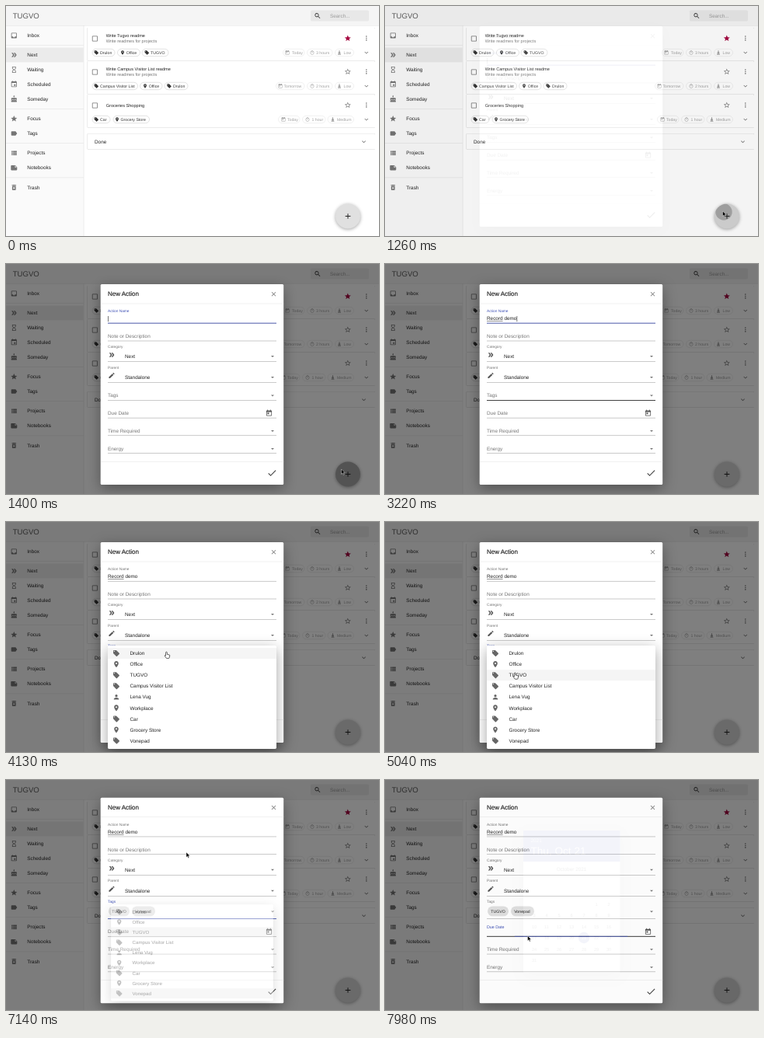
Recreate the animation shown at these times as an HTML page. Size 480 by 296 pixels, loop 8000 ms.

```html
<!DOCTYPE html>
<html lang="en">
<head>
<meta charset="utf-8">
<title>New action</title>
<style>
html, body { margin: 0; width: 100%; height: 100%; overflow: hidden; background: #fff; }
svg { display: block; width: 480px; height: 296px; }
text { font-family: "Liberation Sans", Arial, sans-serif; white-space: pre; text-rendering: geometricPrecision; }
.card { filter: drop-shadow(0 .6px .6px rgba(0,0,0,.32)); }
.float { filter: drop-shadow(0 1.6px 2.2px rgba(0,0,0,.36)); }
.deep { filter: drop-shadow(0 5px 9px rgba(0,0,0,.36)); }
</style>
</head>
<body>
<svg id="stage" viewBox="0 0 480 296" xmlns="http://www.w3.org/2000/svg"></svg>
<script>
const LOOP = 8000, STEP = 70;
const INK = '#212121', SOFT = '#757575', PALE = '#a0a0a0', BLUE = '#3f51b5', LINE = '#949494';

const ICON = {
  inbox: 'M19 3H5c-1.1 0-2 .9-2 2v14c0 1.1.9 2 2 2h14c1.1 0 2-.9 2-2V5c0-1.1-.9-2-2-2zm0 12h-4c0 1.7-1.3 3-3 3s-3-1.3-3-3H5V5h14z',
  next: 'M15.5 5H11l5 7-5 7h4.5l5-7zM8.5 5H4l5 7-5 7h4.5l5-7z',
  wait: 'M6 2v6l4 4-4 4v6h12v-6l-4-4 4-4V2zm10 14.5V20H8v-3.5l4-4zm-4-5l-4-4V4h8v3.5z',
  event: 'M17 12h-5v5h5zM16 1v2H8V1H6v2H5c-1.1 0-2 .9-2 2v14c0 1.1.9 2 2 2h14c1.1 0 2-.9 2-2V5c0-1.1-.9-2-2-2h-1V1zm3 18H5V8h14z',
  today: 'M7 10h5v5H7zM16 1v2H8V1H6v2H5c-1.1 0-2 .9-2 2v14c0 1.1.9 2 2 2h14c1.1 0 2-.9 2-2V5c0-1.1-.9-2-2-2h-1V1zm3 18H5V8h14z',
  cake: 'M12 0l-1.7 3C9.500 4.500 10.500 6 12 6s2.500-1.500 1.700-3zM11 7v2H6c-1.700 0-3 1.300-3 3v1.500c0 2 2.200 2.600 3.400 1.400l2.100-2.100 2.100 2.100c.8.8 2 .8 2.800 0l2.100-2.100 2.100 2.100c1.200 1.200 3.400.6 3.400-1.400V12c0-1.700-1.300-3-3-3h-5V7zM3 16.400V22h18v-5.600c-1.500 1-3.300.7-4.400-.4l-1.100-1.100-1.100 1.100c-1.300 1.300-3.500 1.300-4.800 0l-1.100-1.100L7.400 16c-1.100 1.100-2.900 1.400-4.400.4z',
  star: 'M12 17.300L18.200 21l-1.700-7L22 9.200l-7.200-.6L12 2 9.200 8.600 2 9.200 7.500 14l-1.700 7z',
  starLine: 'M22 9.200l-7.200-.6L12 2 9.200 8.600 2 9.200 7.500 14l-1.700 7 6.200-3.700 6.200 3.700-1.600-7zM12 15.400l-3.800 2.300 1-4.300-3.300-2.900 4.400-.4L12 6.100l1.700 4 4.400.4-3.300 2.900 1 4.300z',
  label: 'M17.600 5.800C17.300 5.300 16.700 5 16 5H5c-1.100 0-2 .9-2 2v10c0 1.100.9 2 2 2h11c.7 0 1.300-.3 1.600-.8L22 12z',
  list: 'M4 14h4v-4H4zm0 5h4v-4H4zM4 9h4V5H4zm5 5h12v-4H9zm0 5h12v-4H9zM9 5v4h12V5z',
  note: 'M22 10l-6-6H4c-1.100 0-2 .9-2 2v12c0 1.100.9 2 2 2h16c1.100 0 2-.9 2-2zm-7-4.500l5.500 5.500H15z',
  trash: 'M6 19c0 1.100.9 2 2 2h8c1.100 0 2-.9 2-2V7H6zm2.500-7.100l1.400-1.400 2.100 2.100 2.100-2.100 1.400 1.400-2.100 2.100 2.100 2.100-1.400 1.400-2.100-2.100-2.100 2.100-1.400-1.400 2.100-2.100zM15.500 4l-1-1h-5l-1 1H5v2h14V4z',
  tag: 'M21.400 11.600l-9-9C12 2.200 11.500 2 11 2H4c-1.100 0-2 .9-2 2v7c0 .6.2 1 .6 1.400l9 9c.8.8 2 .8 2.800 0l7-7c.8-.8.800-2 0-2.800zM5.500 7a1.500 1.500 0 1 1 0-3 1.500 1.500 0 0 1 0 3z',
  place: 'M12 2C8.100 2 5 5.100 5 9c0 5.200 7 13 7 13s7-7.800 7-13c0-3.900-3.100-7-7-7zm0 9.500a2.500 2.500 0 1 1 0-5 2.500 2.500 0 0 1 0 5z',
  person: 'M12 12a4 4 0 1 0 0-8 4 4 0 0 0 0 8zm0 2c-2.700 0-8 1.300-8 4v2h16v-2c0-2.700-5.300-4-8-4z',
  timer: 'M15 1H9v2h6zm-4 13h2V8h-2zM12 4a9 9 0 1 0 0 18 9 9 0 0 0 0-18zm0 16a7 7 0 1 1 0-14 7 7 0 0 1 0 14z',
  energy: 'M10 2h4v7h2l2 9H6l2-9h2zM5 19h14v3H5z',
  more: 'M10 6a2 2 0 1 0 4 0 2 2 0 0 0-4 0zM10 12a2 2 0 1 0 4 0 2 2 0 0 0-4 0zM10 18a2 2 0 1 0 4 0 2 2 0 0 0-4 0z',
  open: 'M16.600 8.600L12 13.200 7.400 8.600 6 10l6 6 6-6z',
  drop: 'M7 10l5 5 5-5z',
  box: 'M19 5v14H5V5zm0-2H5c-1.100 0-2 .9-2 2v14c0 1.100.9 2 2 2h14c1.100 0 2-.9 2-2V5c0-1.100-.9-2-2-2z',
  add: 'M19 13h-6v6h-2v-6H5v-2h6V5h2v6h6z',
  close: 'M19 6.400L17.600 5 12 10.600 6.400 5 5 6.400 10.600 12 5 17.600 6.400 19l5.600-5.600 5.600 5.600 1.400-1.400L13.400 12z',
  check: 'M9 16.200L4.800 12l-1.400 1.400L9 19 21 7l-1.400-1.400z',
  pen: 'M3 17.200V21h3.800L17.800 9.900 14.100 6.200zM20.700 7c.4-.4.4-1 0-1.400l-2.300-2.300c-.4-.4-1-.4-1.400 0l-1.800 1.800 3.700 3.700z',
  find: 'M15.500 14h-.8l-.3-.3a6.500 6.500 0 1 0-.7.7l.3.300v.8l5 5 1.500-1.500zm-6 0a4.500 4.500 0 1 1 0-9 4.500 4.500 0 0 1 0 9z'
};

const text = (x, y, s, size = 6.4, fill = INK, more = '') =>
  `<text x="${x}" y="${y}" font-size="${size}" fill="${fill}" ${more}>${s}</text>`;
const icon = (name, cx, cy, size = 9.6, fill = SOFT) =>
  `<path d="${ICON[name]}" fill="${fill}" fill-rule="evenodd" transform="translate(${cx - size / 2} ${cy - size / 2}) scale(${size / 24})"/>`;
const rect = (x, y, w, h, fill, more = '') =>
  `<rect x="${x}" y="${y}" width="${w}" height="${h}" fill="${fill}" ${more}/>`;
const rule = (x, y, w, fill = LINE, h = .5, more = '') => rect(x, y - h / 2, w, h, fill, more);
const group = (id, body, more = '') => `<g id="${id}" ${more}>${body}</g>`;

// name, icon, centre line
const NAV = [['Inbox', 'inbox', 38], ['Next', 'next', 63], ['Waiting', 'wait', 82], ['Scheduled', 'event', 100.700],
  ['Someday', 'cake', 119.500], ['Focus', 'star', 145], ['Tags', 'label', 164], ['Projects', 'list', 189.200],
  ['Notebooks', 'note', 208.200], ['Trash', 'trash', 233.500]];

// chip: left, right, icon, icon x, text x, label
const CARDS = [
  { y: 42, title: 'Write Tugvo readme', sub: 'Write readmes for projects', star: 1,
    chips: [[111, 140, 'tag', 116.300, 121, 'Drulon'], [143.500, 172.500, 'place', 150, 154.800, 'Office'], [175, 209, 'tag', 181.300, 186, 'TUGVO']],
    info: [[356.500, 384, 'today', 362, 368, 'Today'], [387.500, 420, 'timer', 394, 399, '3 hours'], [423.500, 447.500, 'energy', 429, 434.500, 'Low']] },
  { y: 85, title: 'Write Campus Visitor List readme', sub: 'Write readmes for projects',
    chips: [[111, 169.500, 'tag', 116.300, 121, 'Campus Visitor List'], [172.500, 201, 'place', 179, 183.700, 'Office'], [204, 234, 'tag', 210, 215, 'Drulon']],
    info: [[347.500, 384, 'today', 353, 357.500, 'Tomorrow'], [387.500, 420, 'timer', 394, 399, '2 hours'], [423.500, 447.500, 'energy', 429, 434.500, 'Low']] },
  { y: 128, title: 'Groceries Shopping',
    chips: [[111, 134, 'tag', 116.300, 121, 'Car'], [138, 184.500, 'place', 143, 147.500, 'Grocery Store']],
    info: [[350.500, 378, 'today', 357, 362, 'Today'], [381.500, 411, 'timer', 388, 393.500, '1 hour'], [414, 447.500, 'energy', 420.500, 426, 'Medium']] }
];

const TAGS = [['Drulon', 'tag'], ['Office', 'place'], ['TUGVO', 'tag'], ['Campus Visitor List', 'tag'], ['Lena Vug', 'person'],
  ['Workplace', 'place'], ['Car', 'tag'], ['Grocery Store', 'place'], ['Vonepad', 'tag']];
const ROW = 14.060, TOP = 162;

function chip([l, r, name, ix, tx, s], cy, ink, edge) {
  return rect(l, cy - 4.700, r - l, 9.400, 'none', `rx="4.700" stroke="${edge}" stroke-width=".5"`) +
    icon(name, ix, cy, 6.600, ink) + text(tx, cy + 1.900, s, 5.200, ink);
}

function card(c) {
  const y = c.y, low = y + 18;
  return rect(104.500, y - 14, 370.500, 42.400, '#fff', 'rx="1.200" class="card"') +
    icon('box', 114.400, y, 9.600) +
    text(128.700, y + (c.sub ? -2.100 : 2), c.title, 5.600) +
    (c.sub ? text(128.700, y + 5.300, c.sub, 5.600, SOFT) : '') +
    icon(c.star ? 'star' : 'starLine', 439.800, y - .5, 9.600, c.star ? '#a5063f' : SOFT) +
    icon('more', 463.800, y - .5) + icon('open', 463.800, low) +
    c.chips.map(k => chip(k, low, '#333', '#c4c4c4')).join('') +
    c.info.map(k => chip(k, low, PALE, '#e0e0e0')).join('');
}

function page() {
  return rect(0, 0, 480, 296, '#fff') +
    rect(0, 25, 100, 271, '#fafafa') + rect(99.800, 25, .5, 271, '#dcdcdc') +
    rect(0, 53.600, 99.800, 18.800, '#ebebeb') +
    [50.500, 132.300, 176.600, 220.900].map(y => rule(0, y, 99.800, '#dcdcdc')).join('') +
    NAV.map(([s, name, y]) => icon(name, 10.300, y) + text(27.300, y + 2.100, s)).join('') +
    CARDS.map(card).join('') +
    rect(104.500, 164.300, 370.500, 20.200, '#fff', 'rx="1.200" class="card"') +
    text(114, 177, 'Done') + icon('open', 460.500, 174.700) +
    rect(0, 0, 480, 25.200, '#f5f5f5', 'class="card"') +
    text(8.700, 15.900, 'TUGVO', 9.600, '#5c5c5c') +
    rect(392, 5.600, 75, 14, '#e8e8e8', 'rx="1.600"') +
    icon('find', 401, 12.700, 9.600, '#333') + text(417, 14.900, 'Search...', 6.400, '#9a9a9a') +
    '<clipPath id="fabClip"><circle cx="440" cy="270.500" r="16"/></clipPath>' +
    '<circle id="fab" cx="440" cy="270.500" r="16" class="float"/>' +
    '<g clip-path="url(#fabClip)"><circle id="fabWave" cx="436" cy="265"/></g>' +
    icon('add', 440, 270.500, 11.500, INK);
}

const small = (id, y, s) => text(131, y, s, 4.800, SOFT, `id="${id}"`);
const arrow = y => icon('drop', 343, y);
const focusLine = (id, y) => rule(131, y, 217, BLUE, .8, `id="${id}"`);

function dialog() {
  const upper =
    text(131, 41.300, 'New Action', 8, INK, `stroke="${INK}" stroke-width=".16"`) +
    icon('close', 344.500, 38.700) + rule(122, 51, 235.300, '#e2e2e2') +
    small('nameLabel', 62.400, 'Action Name') + rule(131, 76.200, 217) + focusLine('nameLine', 76.100) +
    text(131, 72.100, '', 6.400, INK, 'id="name"') +
    rule(131, 73.600, 20.600, '#555', .6, 'id="spell"') +
    rect(131, 67, .6, 7.200, INK, 'id="caret"') +
    text(131, 95, 'Note or Description', 6.400, SOFT) + rule(131, 99, 217) +
    small('c', 107.800, 'Category') + icon('next', 136, 117, 9.600, '#555') + text(153, 121.400, 'Next') +
    arrow(118.800) + rule(131, 125.500, 217) +
    small('p', 134.500, 'Parent') + icon('pen', 136, 143.500, 9.600, '#555') + text(153, 148.100, 'Standalone') +
    arrow(145.700) + rule(131, 152.500, 217) +
    text(0, 0, 'Tags', 6.400, SOFT, 'id="tagLabel"');
  const lower =
    rule(131, 175.500, 217) + rule(131, 175.400, 217, INK, .8, 'id="tagHover"') + focusLine('tagLine', 175.400) +
    text(0, 0, 'Due Date', 6.400, SOFT, 'id="dateLabel"') + icon('today', 338.500, 192, 9.600, '#555') +
    rule(131, 198.100, 217) + rule(131, 198, 217, INK, .8, 'id="dateHover"') + focusLine('dateLine', 198) +
    text(131, 216.800, 'Time Required', 6.400, SOFT) + arrow(214.800) + rule(131, 220.800, 217) +
    text(131, 239.700, 'Energy', 6.400, SOFT) + arrow(237.800) + rule(131, 243.600, 217) +
    rule(122, 254.500, 235.300, '#e2e2e2') + icon('check', 342.300, 269, 14, '#444');
  const pill = (id, x, w, tx, s) => group(id, rect(x, 162.500, w, 12.800, '#e0e0e0', 'rx="6.400"') + text(tx, 170.800, s, 5.200));
  return rect(0, 0, 480, 296, '#000', 'opacity=".5"') +
    rect(121.700, 26, 235.500, 258, '#fff', 'id="paper" rx="1.600" class="deep"') +
    group('upper', upper) + group('lower', lower) + arrow(169.300) +
    pill('pillA', 132, 27, 136.300, 'TUGVO') + pill('pillB', 162, 30, 166.200, 'Vonepad');
}

function menu() {
  return rect(131, 158.900, 217, 133, '#fff', 'rx="1.600" class="deep"') +
    '<clipPath id="rowClip"><rect id="rowBox" x="131" width="217" height="14.060"/></clipPath>' +
    TAGS.map((_, i) => rect(131, TOP + i * ROW, 217, ROW, '#000', `id="row${i}"`)).join('') +
    '<g clip-path="url(#rowClip)"><circle id="wave" cx="168" fill="#000"/></g>' +
    TAGS.map(([s, name], i) => {
      const y = TOP + (i + .5) * ROW;
      return icon(name, 142, y, 9.600, '#666') + text(159.500, y + 2.200, s);
    }).join('');
}

function picker() {
  let out = rect(0, 0, 480, 296, '#000', 'opacity=".3"') +
    rect(178, 65, 124.500, 183, '#fff', 'rx="1.600" class="deep"') + rect(178, 65, 124.500, 40, BLUE) +
    text(187.500, 80, '2021', 6.400, '#fff') + text(187.500, 96, 'Thu, Oct 21', 13.600, '#fff') +
    text(240, 117.300, 'October 2021', 6.400, INK, 'text-anchor="middle"') +
    `<circle cx="256" cy="203" r="7.200" fill="${BLUE}"/>`;
  for (let d = 1; d <= 31; d++) {
    const k = d + 4;
    out += text(192 + k % 7 * 16, 162 + Math.floor(k / 7) * 14.400, d, 5.600, d === 21 ? '#fff' : INK, 'text-anchor="middle"');
  }
  return out;
}

document.getElementById('stage').innerHTML = page() + group('dialog', dialog()) + group('menu', menu()) + group('picker', picker()) +
  group('mouse',
    '<path id="arrow" d="M0 0v6.500l1.500-1.400 1.100 2.400 1.100-.5-1.100-2.300h2.100z" fill="#000" stroke="#fff" stroke-width=".4"/>' +
    '<path id="hand" d="M2.300 0c.6 0 .9.4.9.9v2.200l2.600.6c.6.1.9.5.8 1.100l-.5 2.300c-.1.7-.4 1.100-.9 1.100H2.800c-.4 0-.7-.2-.9-.5L.1 5.200c-.4-.6.3-1.100.8-.7l.5.4v-4c0-.5.3-.9.9-.9z" fill="#fff" stroke="#000" stroke-width=".6"/>');

const $ = {};
document.querySelectorAll('[id]').forEach(e => $[e.id] = e);
const set = (id, o) => { for (const k in o) $[id].setAttribute(k, o[k]); };
const show = (id, on) => set(id, { opacity: +on });

const clamp = v => Math.max(0, Math.min(1, v));
const span = (t, from, len) => clamp((t - from) / len);
const out = p => 1 - (1 - p) * (1 - p);
const smooth = p => p * p * (3 - 2 * p);

// time, x, y
const PATH = [[70, 6, 291], [280, 380, 45], [380, 380, 45], [910, 434.500, 263], [1260, 434.500, 264], [1400, 431.500, 264],
  [1680, 308, 168], [3800, 308, 168], [4270, 176, 167], [4620, 142, 257], [5010, 165, 194], [6090, 165, 194],
  [6230, 166, 281], [6650, 166, 281], [6860, 232, 93], [7280, 232, 93], [7770, 183.500, 200.500]];
// time, letters typed
const TYPED = [[2030, 1], [2310, 2], [2380, 3], [2450, 4], [2590, 5], [2800, 7], [3010, 9], [3080, 10], [3220, 11]];

function mouseAt(t) {
  const i = PATH.findIndex(k => k[0] > t);
  if (i < 0) return PATH[PATH.length - 1].slice(1);
  if (!i) return PATH[0].slice(1);
  const [a, x, y] = PATH[i - 1], [b, u, v] = PATH[i], p = smooth((t - a) / (b - a));
  return [x + (u - x) * p, y + (v - y) * p];
}

function floatLabel(id, p, from, rise, on) {
  set(id, { transform: `translate(131 ${from - rise * p}) scale(${1 - .25 * p})`, fill: on ? BLUE : SOFT });
}

function grow(id, p) {
  const w = 217 * p;
  set(id, { x: 239.500 - w / 2, width: w });
}

function draw(t) {
  const [mx, my] = mouseAt(t);
  const menuOn = t >= 3640 && t < 7000;
  const field = t < 3640 ? 'name' : t < 7895 ? 'tag' : 'date';

  set('fab', { fill: t >= 840 ? '#d5d5d5' : '#e0e0e0' });
  set('fabWave', { r: 26 * out(span(t, 1190, 300)), opacity: .22 * (1 - span(t, 1400, 280)) });

  show('dialog', 0);
  set('dialog', { opacity: 1 - (1 - span(t, 1255, 165)) ** 3 });
  const shift = t >= 5460 ? 3.250 : 0;
  set('paper', { y: 26 - shift, height: 258 + 2 * shift });
  set('upper', { transform: `translate(0 ${-shift})` });
  set('lower', { transform: `translate(0 ${shift})` });

  const key = TYPED.filter(k => k[0] <= t).pop();
  $.name.textContent = 'Record demo'.slice(0, key ? key[1] : 0);
  set('caret', { x: 131 + (key ? $.name.getComputedTextLength() + .2 : 0) });
  show('caret', t < 1820 || t >= 2030 && field === 'name');
  show('spell', t >= 3010);
  set('nameLabel', { fill: field === 'name' ? BLUE : SOFT });
  show('nameLine', field === 'name');

  floatLabel('tagLabel', out(span(t, 3640, 200)), 171.300, 10.100, field === 'tag');
  floatLabel('dateLabel', out(span(t, 7895, 200)), 194.200, 9.600, field === 'date');
  show('tagHover', t >= 1610 && t < 3640);
  show('dateHover', t >= 7700);
  show('tagLine', field === 'tag');
  grow('tagLine', out(span(t, 3640, 200)));
  grow('dateLine', out(span(t, 7895, 200)));
  show('pillA', t >= 5460);
  show('pillB', t >= 6440);

  const opened = out(span(t, 3640, 270)), closed = span(t, 7000, 230);
  const s = opened * (1 - .25 * closed);
  set('menu', {
    opacity: opened * (1 - closed),
    transform: `translate(239.500 180) scale(${.75 + .25 * s} ${.56 + .44 * s}) translate(-239.500 -180)`
  });
  const over = menuOn && my > TOP && mx > 131 && mx < 348 ? Math.floor((my - TOP) / ROW) : -1;
  TAGS.forEach((_, i) => {
    const chosen = i === 2 && t >= 5460 || i === 8 && t >= 6440;
    set('row' + i, { opacity: (chosen ? .08 : 0) + (i === over ? .04 : 0) });
  });
  const second = t >= 6000, start = second ? 6230 : 5320, row = second ? 8 : 2;
  set('rowBox', { y: TOP + row * ROW });
  set('wave', {
    cy: TOP + (row + .5) * ROW,
    r: 180 * out(span(t, start, 480)),
    opacity: .19 * (1 - span(t, start + 260, 330))
  });

  set('picker', { opacity: .06 * span(t, 7940, 40) });

  const hand = t >= 1610 && t < 2060 || t >= 3500 && t < 6720;
  set('mouse', { transform: `translate(${mx} ${my})` });
  show('mouse', t >= 70 && t < 2060 || t >= 3500);
  show('hand', hand);
  show('arrow', !hand);
}

function tick(now) {
  draw(Math.floor(now % LOOP / STEP) * STEP);
  requestAnimationFrame(tick);
}
draw(0);
requestAnimationFrame(tick);
</script>
</body>
</html>
```
